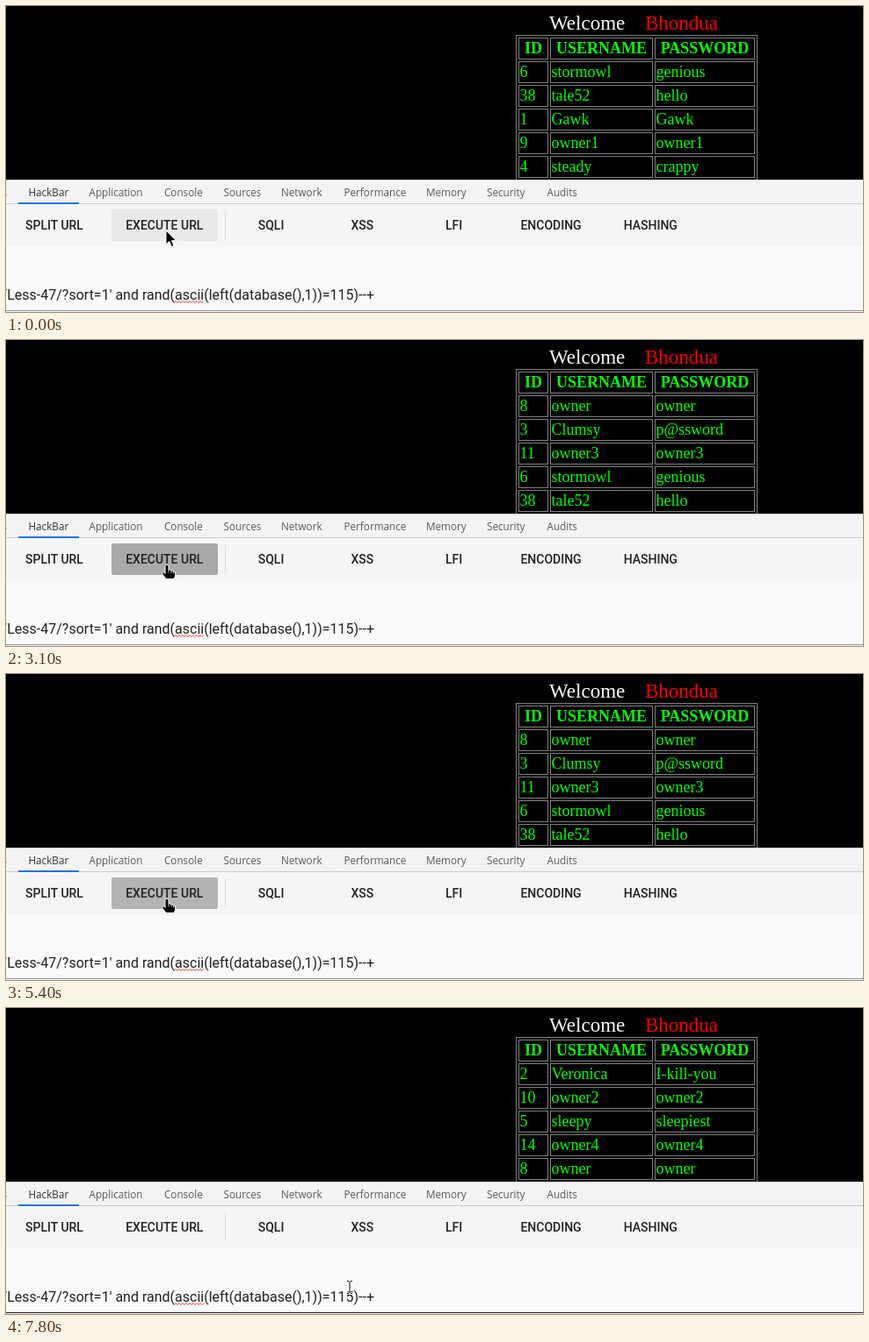
Write an HTML page that moves like this. It is 975 by 349 pixels and loops after 8000 ms.

```html
<!DOCTYPE html>
<html lang="en">
<head>
<meta charset="utf-8">
<title>Sorted user table</title>
<style>
  html, body { margin: 0; width: 100%; height: 100%; overflow: hidden; background: #000; }
  svg { display: block; }
  text { white-space: pre; }
  .page { font: 18px "Liberation Serif", serif; fill: #0f0; }
  .title { font-size: 23px; }
  .head { font-weight: bold; text-anchor: middle; }
  .tab { font: 11.7px "Open Sans", sans-serif; fill: #5a5a5a; }
  .tab.active { fill: #333; }
  .button { font: 500 14px Roboto, sans-serif; fill: #212121; text-anchor: middle; }
  .input { font: 16px Roboto, sans-serif; fill: #212121; text-anchor: end; }
  .cell { fill: none; stroke: #808080; }
</style>
</head>
<body>
<svg id="stage" width="975" height="349" viewBox="0 0 975 349">
  <defs><clipPath id="clip"><rect x="120" y="232" width="121" height="36" rx="2"/></clipPath></defs>
  <rect width="975" height="349"/>
  <g id="page"></g>
  <rect y="198" width="975" height="28" fill="#f3f3f3"/>
  <rect y="198" width="975" height="1" fill="#d0d0d0"/>
  <rect y="226" width="975" height="48" fill="#f5f5f5"/>
  <rect y="225" width="975" height="1" fill="#ccc"/>
  <rect x="14" y="224" width="69" height="2" fill="#1a73e8"/>
  <rect y="274" width="975" height="75" fill="#fafafa"/>
  <rect x="249" y="234" width="1" height="32" fill="#dcdcdc"/>
  <rect id="button" x="120" y="232" width="121" height="36" rx="2"/>
  <g id="ripples" clip-path="url(#clip)"></g>
  <g id="tools"></g>
  <path id="squiggle" fill="none" stroke="#e03c31" stroke-width="1"/>
  <rect id="line" y="347" width="975" height="1"/>
  <rect y="348" width="975" height="1" fill="#fafafa"/>
  <g id="arrow" stroke="#fff" stroke-linejoin="round">
    <path d="M0 0V16L3.8 12.6 6.4 18.6 9 17.4 6.4 11.6H11.5Z"/>
  </g>
  <g id="hand" stroke="#fff" stroke-linejoin="round">
    <path d="M-2 1Q-1.8 -1 0 -1T2 1V5Q4 4 5 6Q7 5 7.5 7Q9.7 6.500 9.700 9V12L8 15.500H-1L-5 10Q-6 7.500 -4 7.500L-2 9.500Z"/>
    <path d="M2 5V8.500M5 6V9M7.500 7V9.500" stroke-width=".8"/>
  </g>
  <g id="beam" fill="none">
    <path d="M-3 -7.500H-1L0 -6.500 1 -7.500H3M0 -6.500V5.500M-3 6.500H-1L0 5.500 1 6.500H3" stroke="#fff" stroke-width="2.500"/>
    <path d="M-3 -7.500H-1L0 -6.500 1 -7.500H3M0 -6.500V5.500M-3 6.500H-1L0 5.500 1 6.500H3" stroke="#000"/>
  </g>
</svg>
<script>
const LOOP = 8000, STEP = 100;
const byId = id => document.getElementById(id);

function add(parent, tag, attrs, content = '') {
  const el = document.createElementNS('http://www.w3.org/2000/svg', tag);
  for (const key in attrs) el.setAttribute(key, attrs[key]);
  el.textContent = content;
  byId(parent).append(el);
  return el;
}
const label = (parent, cls, x, y, content) => add(parent, 'text', { class: cls, x, y }, content);

// Row orders returned by each query
const orders = {
  a: ['6 stormowl genious', '38 tale52 hello', '1 Gawk Gawk', '9 owner1 owner1', '4 steady crappy'],
  b: ['8 owner owner', '3 Clumsy p@ssword', '11 owner3 owner3', '6 stormowl genious', '38 tale52 hello'],
  c: ['2 Veronica I-kill-you', '10 owner2 owner2', '5 sleepy sleepiest', '14 owner4 owner4', '8 owner owner']
};
const swaps = [[0, 'a'], [800, 'c'], [1300, 'b'], [1800, 'a'], [2600, 'c'], [3100, 'b'], [3800, 'c'],
  [4400, 'a'], [5400, 'b'], [5900, 'a'], [6300, 'c'], [7200, 'b'], [7500, 'c']];
const clicks = [450, 900, 1400, 2250, 2750, 3450, 3900, 4430, 5013, 5480, 6000, 6850, 7120];

// Page with the table
label('page', 'page title', 618, 27, 'Welcome').style.fill = '#fff';
label('page', 'page title', 727, 27, 'Bhondua').style.fill = '#f00';
add('page', 'rect', { class: 'cell', x: 580.5, y: 33.5, width: 274, height: 200 });
const columns = [[583, 33, 'ID'], [619, 116, 'USERNAME'], [738, 113, 'PASSWORD']];
const cells = [];
for (let row = 0; row < 6; row++) {
  for (const [x, width, name] of columns) {
    add('page', 'rect', { class: 'cell', x: x + .5, y: 36.5 + row * 27, width, height: 24 });
    if (row) cells.push(label('page', 'page', x + 1.5, 54 + row * 27, ''));
    else label('page', 'page head', x + width / 2 + .5, 54, name);
  }
}

// Tool panel
[[-4.5, 's'], [25.5, 'HackBar'], [94.5, 'Application'], [180, 'Console'], [247.5, 'Sources'], [313, 'Network'],
  [384.5, 'Performance'], [478, 'Memory'], [547, 'Security'], [615.5, 'Audits']]
  .forEach(([x, name]) => label('tools', name === 'HackBar' ? 'tab active' : 'tab', x, 217, name));
[[55, 'SPLIT URL'], [180.3, 'EXECUTE URL'], [301.5, 'SQLI'], [405.3, 'XSS'], [509.5, 'LFI'],
  [620, 'ENCODING'], [733.3, 'HASHING']]
  .forEach(([x, name]) => label('tools', 'button', x, 255, name));
label('tools', 'input', 419, 335, "/Less-47/?sort=1' and rand(ascii(left(database(),1))=115)--+");
let wave = 'M191 338.500';
for (let x = 193; x <= 225; x += 2) wave += `L${x} ${x % 4 === 1 ? 336.5 : 338.5}`;
byId('squiggle').setAttribute('d', wave);

const ripples = clicks.map(() => add('ripples', 'circle', {}));
const clamp = v => Math.min(1, Math.max(0, v));
const smooth = v => (v = clamp(v), v * v * (3 - 2 * v));
const mix = (a, b, v) => a + (b - a) * v;

function drawTable(t) {
  const order = orders[swaps.filter(s => s[0] <= t).pop()[1]];
  order.join(' ').split(' ').forEach((value, i) => {
    if (cells[i].textContent !== value) cells[i].textContent = value;
  });
}

function drawRipple(el, age) {
  const grow = smooth(age / 250);
  const shown = age < 0 ? 0 : clamp(age / 145) * (1 - clamp((age - 350) / 200));
  el.setAttribute('cx', mix(182, 180.5, grow));
  el.setAttribute('cy', mix(258, 250, grow));
  el.setAttribute('r', 70 * grow);
  el.setAttribute('fill-opacity', .23 * shown);
}

function drawCursor(t) {
  const go = smooth((t - 7450) / 250);
  const x = mix(183, 391, go), y = mix(257, 319, go);
  const kind = t < 100 ? 'arrow' : y < 268 ? 'hand' : y < 305 ? 'arrow' : 'beam';
  for (const id of ['arrow', 'hand', 'beam']) {
    byId(id).style.display = id === kind ? '' : 'none';
  }
  byId(kind).setAttribute('transform', `translate(${t < 100 ? 182 : x} ${t < 100 ? 256 : y})`);
  byId('button').setAttribute('fill', y > 268 ? 'none' : t < clicks[0] ? '#e8e8e8' : '#dcdcdc');
}

function draw(now) {
  const t = Math.floor(now % LOOP / STEP) * STEP;
  drawTable(t);
  ripples.forEach((el, i) => drawRipple(el, t - clicks[i]));
  drawCursor(t);
  const grey = Math.round(mix(145, 32, clamp((t - 7600) / 200)));
  byId('line').setAttribute('fill', `rgb(${grey},${grey},${grey})`);
}

let start;
function tick(now) {
  start ??= now;
  draw(now - start);
  requestAnimationFrame(tick);
}
draw(0);
requestAnimationFrame(tick);
</script>
</body>
</html>
```
